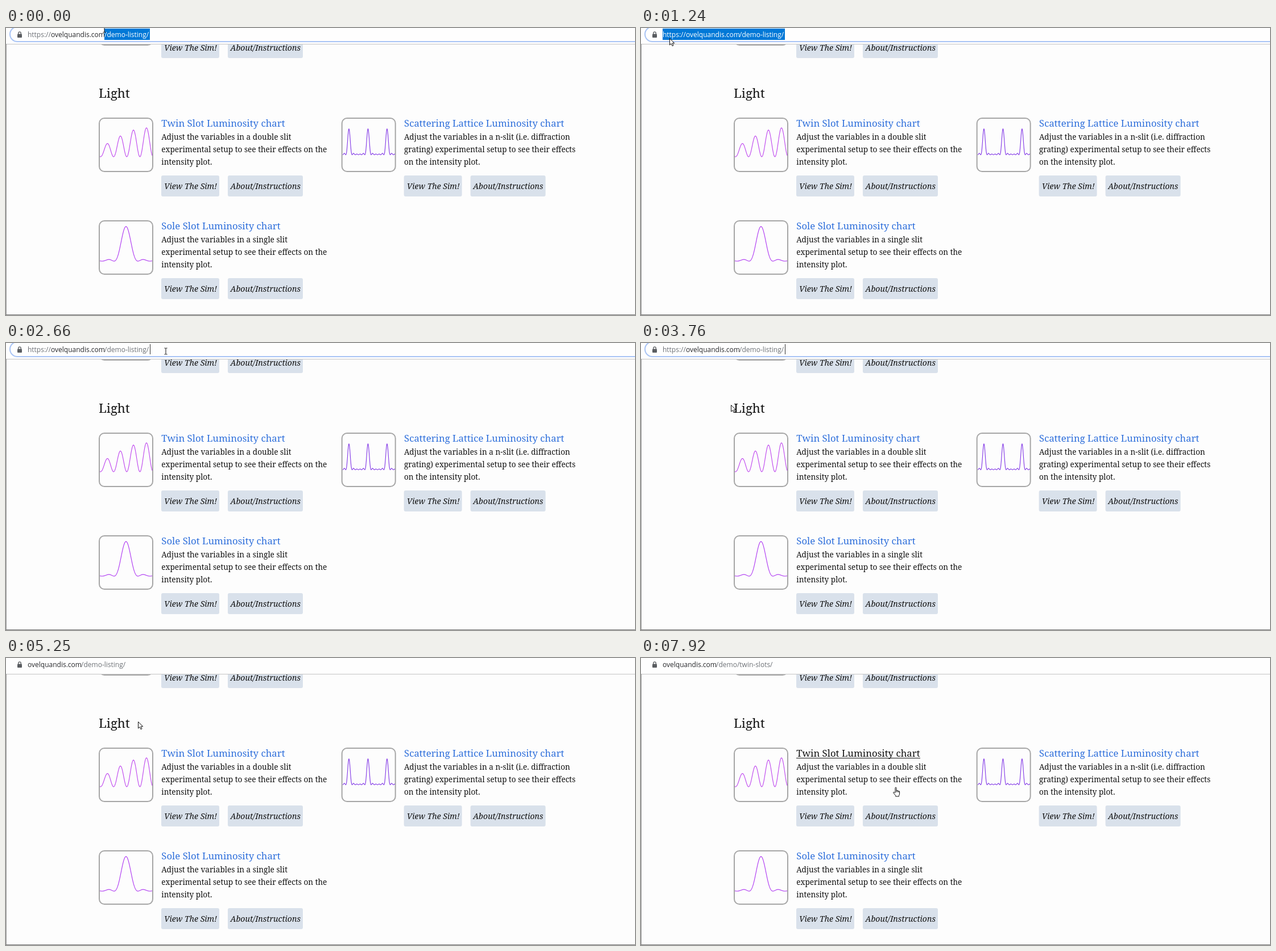
Recreate the animation shown at these times as an HTML page. Size 1106x506 px, loop 8000 ms.

```html
<!DOCTYPE html>
<html lang="en">
<head>
<meta charset="utf-8">
<style>
html, body { margin: 0; width: 100%; height: 100%; overflow: hidden; background: #fdfdfd; }
svg { display: block; }
text { font-family: "Noto Serif", serif; font-size: 13.62px; fill: #121212; white-space: pre; }
.title { font-size: 16.8px; fill: #2e6fdb; }
.title.hover { fill: #121212; }
.heading { font-size: 22.2px; }
.button { font-size: 14.1px; font-style: italic; }
.url { font-family: "Open Sans", sans-serif; font-size: 12px; fill: #6d7176; }
.url.host { fill: #27282b; }
.picked text { fill: #fff; }
.picked rect { fill: #0078d7; }
.thumb { fill: #fdfdfd; stroke: #a6a6a6; stroke-width: 2; }
.plot { fill: none; stroke-width: 1.1; }
.pointer path { fill: #fff; stroke: #111; stroke-linejoin: round; }
.pointer .beam { fill: none; }
</style>
</head>
<body>
<svg id="stage" width="1106" height="506" viewBox="0 0 1106 506"></svg>
<script>
const LOOP = 8000;
const text = (x, y, s, cls = '') => `<text x="${x}" y="${y}" class="${cls}">${s}</text>`;
const rect = (x, y, w, h, extra = '') => `<rect x="${x}" y="${y}" width="${w}" height="${h}" ${extra}/>`;
const thumb = (x, y) => rect(x, y, 94, 94, 'rx="9" class="thumb"');

function plot(x0, x1, color, f) {
  const points = [];
  for (let x = x0; x <= x1; x += 0.5) points.push(x + ',' + f(x).toFixed(2));
  return `<polyline class="plot" stroke="${color}" points="${points.join(' ')}"/>`;
}

const sinc2 = a => a ? (Math.sin(a) / a) ** 2 : 1;
const doubleSlit = x => 227 - 51 * sinc2(0.0213 * (x - 247)) * Math.cos(Math.PI * (x - 247) / 23.1) ** 2;
const singleSlit = x => 411 - 61 * sinc2(Math.PI * (x - 211) / 21);
const grating = x => {
  const a = Math.PI * (x - 636.5) / 33.5, s = Math.sin(a);
  return 223.5 - 45.5 * (Math.abs(s) < 1e-6 ? 1 : (Math.sin(6 * a) / (6 * s)) ** 2);
};

const buttons = (x, y) =>
  rect(x, y, 102, 37, 'rx="3" fill="#d9e1eb"') + text(x + 5, y + 23.5, 'View The Sim!', 'button') +
  rect(x + 117, y, 132, 37, 'rx="3" fill="#d9e1eb"') + text(x + 121.5, y + 23.5, 'About/Instructions', 'button');

const card = (x, y, title, lines, id) =>
  thumb(x, y) +
  `<g id="${id}">${text(x + 109.3, y + 15, title, 'title')}</g>` +
  lines.map((s, i) => text(x + 109.3, y + 37.5 + 22 * i, s)).join('') +
  buttons(x + 109, y + 101);

const longUrl = text(38, 16, 'https://', 'url') + text(79, 16, 'ovelquandis.com', 'url host') +
  text(173, 16, '/demo-listing/', 'url');
const heading = text(163, 123, 'Light', 'heading');

document.getElementById('stage').innerHTML = `
  <defs>
    <clipPath id="urlClip">${rect(0, 1, 0, 20)}</clipPath>
    <clipPath id="headClip">${rect(163, 97, 0, 35)}</clipPath>
  </defs>
  ${rect(0, 0, 1106, 506, 'fill="#fdfdfd"')}
  ${thumb(164, -64)}${buttons(273, 16)}
  ${heading}
  <g id="headPick" class="picked" clip-path="url(#headClip)">${rect(163, 97, 55, 35)}${heading}</g>
  ${card(164, 159, 'Twin Slot Luminosity chart', ['Adjust the variables in a double slit',
    'experimental setup to see their effects on the', 'intensity plot.'], 'twin')}
  ${card(590.7, 159, 'Scattering Lattice Luminosity chart', ['Adjust the variables in a n-slit (i.e. diffraction',
    'grating) experimental setup to see their effects', 'on the intensity plot.'], 'lattice')}
  ${card(164, 340, 'Sole Slot Luminosity chart', ['Adjust the variables in a single slit',
    'experimental setup to see their effects on the', 'intensity plot.'], 'sole')}
  ${plot(165, 257, '#bd42ee', doubleSlit)}
  ${plot(592, 684, '#8136e6', grating)}
  ${plot(165, 257, '#ad35f2', singleSlit)}
  ${rect(0, 0, 1106, 28, 'fill="#fefefe"')}
  <path d="M0 28.5H1106" stroke="#c4c4c4"/>
  <path d="M.5 28V506" stroke="#9a9a9a"/>
  <path d="M0 505.5H1106" stroke="#777"/>
  <rect x="20" y="10.5" width="8" height="6.5" rx="1" fill="#5a5d61"/>
  <path d="M21.8 11V9a2.2 2.2 0 0 1 4.4 0V11" fill="none" stroke="#5a5d61" stroke-width="1.3"/>
  <g id="editing">
    ${rect(7, -2, 1200, 26, 'rx="13" fill="none" stroke="#a9c4f5" stroke-width="2"')}
    ${longUrl}
    <g class="picked" clip-path="url(#urlClip)">${rect(38, 1, 215, 20)}${longUrl.replace(/url host/g, 'url')}</g>
    <path id="caret" d="M253.5 2V20" stroke="#333"/>
  </g>
  <g id="resting">${text(38, 16, 'ovelquandis.com', 'url host')}<text id="path" x="132" y="16" class="url"></text></g>
  <path id="underline" d="M273 176.5H491" stroke="#121212"/>
  <g class="pointer">
    <path id="arrow" d="M.5 .5V12L3.2 9.5L5 13.7L7 12.8L5.2 8.8H8.8Z"/>
    <path id="beam" class="beam" d="M-2.5 -5.5H-.5L0 -5L.5 -5.5H2.5M0 -5V5M-2.5 5.5H-.5L0 5L.5 5.5H2.5"/>
    <path id="hand" d="M4 10V1.8Q4 .5 5 .5T6 1.8V6Q7.4 5.2 8 6.5Q9.4 5.9 10 7.2Q11.6 6.9 11.6 8.5V11.5Q11.6 13.5 10.5 15V16.5H4.7V15L1 10.6Q.3 9.2 1.3 8.8Q2.2 8.6 4 10.7M6 6V9M8 6.5V9M10 7.2V9.5"/>
  </g>`;

const $ = id => document.getElementById(id);
// time, pointer kind, x, y
const moves = [
  [0, 'beam', 173, 2], [130, 'beam', 147, 2], [280, 'beam', 109, 2], [430, 'beam', 73, 2],
  [580, 'beam', 51, 2], [740, 'beam', 41, 4], [1000, 'beam', 41, 8], [1120, 'arrow', 44, 12],
  [1240, 'arrow', 50, 18], [1360, 'arrow', 57, 25], [1480, 'arrow', 61, 30], [1740, 'arrow', 62, 30],
  [1890, 'arrow', 92, 27], [2010, 'arrow', 155, 20], [2130, 'arrow', 232, 11], [2250, 'beam', 281, 14.5],
  [3170, 'hand', 270, 32], [3320, 'arrow', 180, 72], [3470, 'arrow', 151, 90], [3620, 'arrow', 157, 106],
  [3760, 'arrow', 158, 109], [4020, 'arrow', 162, 110], [4290, 'arrow', 162, 112], [4560, 'beam', 180, 117],
  [4690, 'beam', 212, 118], [4840, 'arrow', 232, 112], [5390, 'arrow', 243, 120], [5510, 'arrow', 257, 134],
  [5660, 'arrow', 300, 161], [5810, 'hand', 322, 170], [5940, 'hand', 338, 174], [6070, 'hand', 343, 175],
  [6210, 'hand', 351, 170], [7920, 'hand', 443, 227.5]
];
const show = (id, on) => $(id).style.display = on ? '' : 'none';

function draw(t) {
  const [, kind, x, y] = moves.findLast(m => m[0] <= t);
  for (const id of ['arrow', 'beam', 'hand']) show(id, id === kind);
  $(kind).setAttribute('transform', `translate(${x} ${y})`);

  const editing = t < 4560;
  show('editing', editing);
  show('resting', !editing);
  $('path').textContent = t < 7920 ? '/demo-listing/' : '/demo/twin-slots/';
  show('caret', t >= 2660 && t < 3170 || t >= 3760 && t < 4290);

  const from = t >= 740 ? 38 : x;
  const urlBox = $('urlClip').firstChild;
  urlBox.setAttribute('x', from);
  urlBox.setAttribute('width', t < 2660 ? 253 - from : 0);

  show('headPick', t >= 4560 && t < 5250);
  $('headClip').firstChild.setAttribute('width', t < 4690 ? 15 : t < 4840 ? 46 : 55);

  const hover = t >= 5810;
  $('twin').firstChild.classList.toggle('hover', hover);
  show('underline', hover);
}

const start = performance.now();
function tick() {
  draw((performance.now() - start) % LOOP);
  requestAnimationFrame(tick);
}
tick();
</script>
</body>
</html>
```
